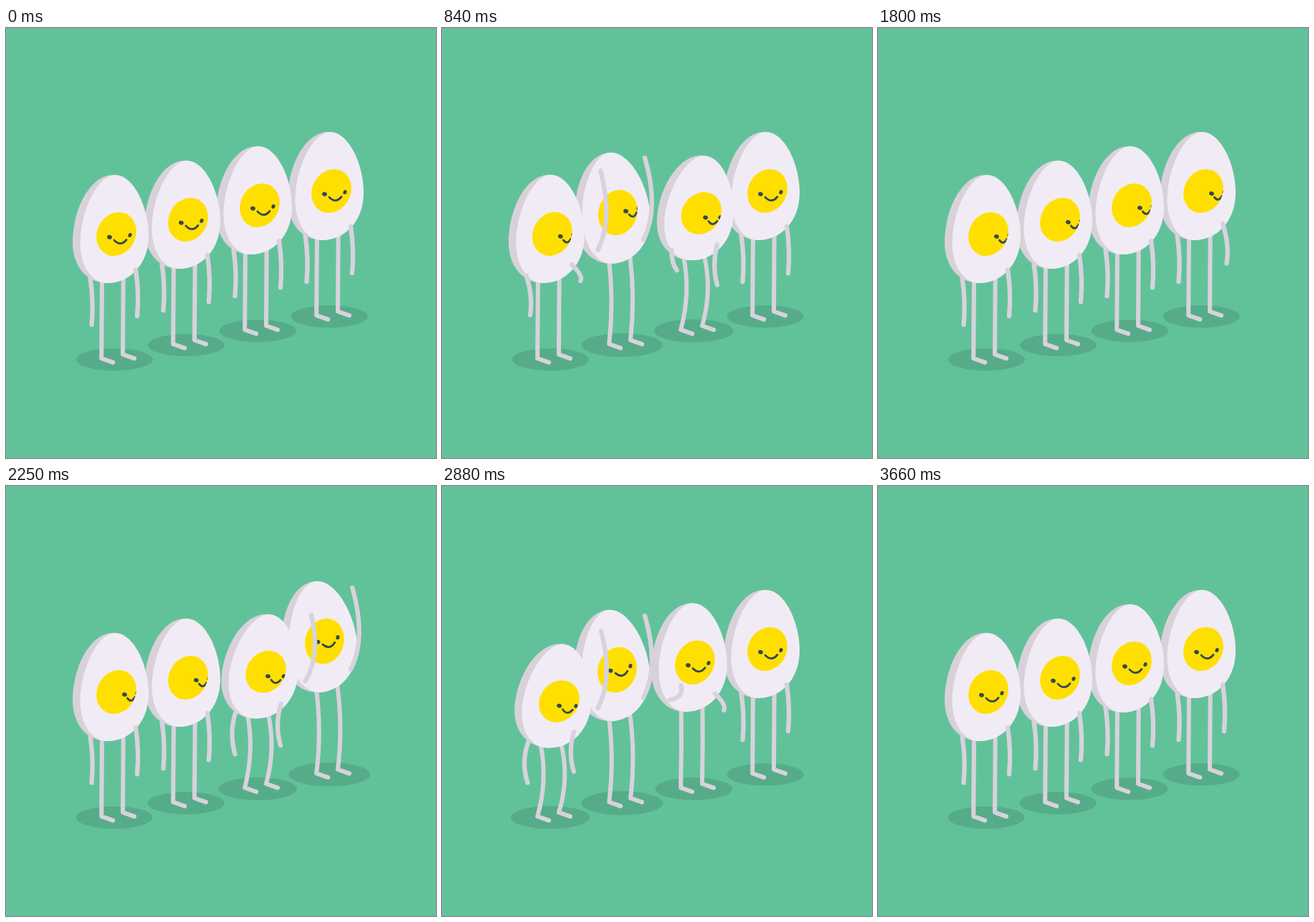
An HTML page with a canvas that plays this animation: 600 px wide and 600 px high, repeating every 3.69 s.

```html
<!DOCTYPE html>
<html lang="en">
<head>
<meta charset="utf-8">
<title>Egg wave</title>
<style>
  html, body { margin: 0; width: 100%; height: 100%; overflow: hidden; background: #61c29a; }
  canvas { display: block; width: 600px; height: 600px; }
</style>
</head>
<body>
<canvas id="stage" width="600" height="600"></canvas>
<script>
const LOOP = 3690, BACK = 1800, STEP = 300, ARM_LAG = 60, EGGS = 4;
const BG = '#61c29a', SHADOW = '#56ac89', WHITE = '#f1ebf5', LIMB = '#d8d2dc';
const SIDE = '#d9d1da', YOLK = '#ffdf00', INK = '#37474f';
const CENTER = { x: 154, y: 287.5 };

// An egg crouches, jumps and settles; tilt is in radians.
const CROUCHED = 190, UP = 460, SETTLED = 870;
const CROUCH = { x: 9.5, y: 13, tilt: .11, look: 2.5, bend: 6.5, grow: 1.5, stretch: -.03 };
const JUMP = { x: -9.6, y: -11, tilt: -.13, look: -4.5, bend: 4, grow: 3.5, stretch: .025 };

const g = document.getElementById('stage').getContext('2d');
const clamp = x => Math.min(1, Math.max(0, x));
const part = (t, from, to) => clamp((t - from) / (to - from));
const ease = (t, from, to) => (1 - Math.cos(Math.PI * part(t, from, to))) / 2;

const crouchAt = t => ease(t, 0, CROUCHED) - ease(t, CROUCHED, UP);
const jumpAt = t => ease(t, CROUCHED, UP) - ease(t, UP, SETTLED);
const turnAt = t => ease(t, 0, 360);
const raiseAt = t => part(t, 155, 465) - part(t, 465, 900) ** 1.25;

function fill(color, trace) {
  g.beginPath();
  trace();
  g.fillStyle = color;
  g.fill();
}

function stroke(color, width, trace) {
  g.beginPath();
  trace();
  g.strokeStyle = color;
  g.lineWidth = width;
  g.stroke();
}

const oval = (x, y, rx, ry, turn = 0) => g.ellipse(x, y, rx, ry, turn, 0, 2 * Math.PI);

function shell() {
  fill(SIDE, () => {
    g.moveTo(152, 205);
    g.bezierCurveTo(118, 203, 93, 252, 93, 299);
    g.bezierCurveTo(93, 332, 112, 356, 142, 356);
  });
  fill(WHITE, () => {
    g.moveTo(152, 205);
    g.bezierCurveTo(178, 205, 199, 250, 199, 290);
    g.bezierCurveTo(199, 330, 172, 356, 142, 356);
    g.bezierCurveTo(119, 356, 103.5, 332, 103.5, 300);
    g.bezierCurveTo(103.5, 259, 126, 206, 152, 205);
  });
}

function face(turn, look) {
  const px = x => x * (1 - .38 * turn) + 17.3 * turn;
  g.save();
  fill(YOLK, () => oval(0, 0, 26.8, 31.5, .48));
  g.clip();
  g.translate(0, look);
  fill(INK, () => oval(px(-9.5), 4.3 - .8 * turn, 3.4, 2.9, .2));
  fill(INK, () => oval(px(19), 1.6, 2.5, 3, .4));
  stroke(INK, 2.8, () => {
    g.moveTo(px(-3), 8.6);
    g.quadraticCurveTo(px(5.8), 18 - 2 * turn, px(14), 8 - turn);
  });
  g.restore();
}

function leg(hip, x, y, bend) {
  stroke(LIMB, 6, () => {
    g.moveTo(hip.x, hip.y);
    g.quadraticCurveTo((hip.x + x) / 2 + 2 * bend, (hip.y + y) / 2, x, y);
    g.lineTo(x + 16, y + 5.7);
  });
}

// The hand swings on an arc from below the shoulder to above it, passing in front.
function arm(x, y, raise, crouch) {
  const swing = Math.PI * raise;
  const sx = x + 3 * crouch, sy = y - 22 * raise + 8 * crouch;
  const hx = x + 2 + 14 * Math.sin(swing) ** 2, hy = y - 35.5 + 100.5 * Math.cos(swing);
  const bowX = 2 + 9 * raise - 7 * crouch, bowY = 7 * raise;
  stroke(LIMB, 6.3, () => {
    g.moveTo(sx, sy);
    g.quadraticCurveTo((sx + hx) / 2 + 2 * bowX, (sy + hy) / 2 + 2 * bowY, hx, hy);
  });
}

function egg(i, t) {
  const out = t - STEP * i, back = t - BACK - STEP * (EGGS - 1 - i);
  const both = f => f(out) + f(back);
  const crouch = both(crouchAt), jump = both(jumpAt);
  const mix = key => crouch * CROUCH[key] + jump * JUMP[key];
  const cx = CENTER.x + mix('x'), cy = CENTER.y + mix('y');
  const tilt = mix('tilt'), bend = mix('bend'), grow = mix('grow'), tall = 1 + mix('stretch');
  const hip = (x, y) => ({
    x: cx + x * Math.cos(tilt) - y * Math.sin(tilt),
    y: cy + x * Math.sin(tilt) + y * Math.cos(tilt)
  });

  g.save();
  g.translate(100 * i, -20 * i);
  fill(SHADOW, () => oval(151.2, 462.5, 53.5 + grow, 15.6 + grow * .3));
  leg(hip(-20, 60), 133.2, 461, bend);
  leg(hip(9.7, 60), 163, 455.5, bend);

  g.save();
  g.translate(cx, cy);
  g.rotate(tilt);
  g.scale(1, tall);
  g.save();
  g.translate(-CENTER.x, -CENTER.y);
  shell();
  g.restore();
  face(turnAt(out) - turnAt(back), mix('look'));
  g.restore();

  // The left arm leads on the way out, the right one on the way back.
  arm(117.5, 349, raiseAt(out) + raiseAt(back - ARM_LAG), crouch);
  arm(181, 337, raiseAt(out - ARM_LAG) + raiseAt(back), crouch);
  g.restore();
}

function draw(t) {
  g.fillStyle = BG;
  g.fillRect(0, 0, 600, 600);
  g.lineCap = g.lineJoin = 'round';
  for (let i = EGGS - 1; i >= 0; i--) egg(i, t);
}

const start = performance.now();
function tick() {
  draw((performance.now() - start) % LOOP);
  requestAnimationFrame(tick);
}
tick();
</script>
</body>
</html>
```
